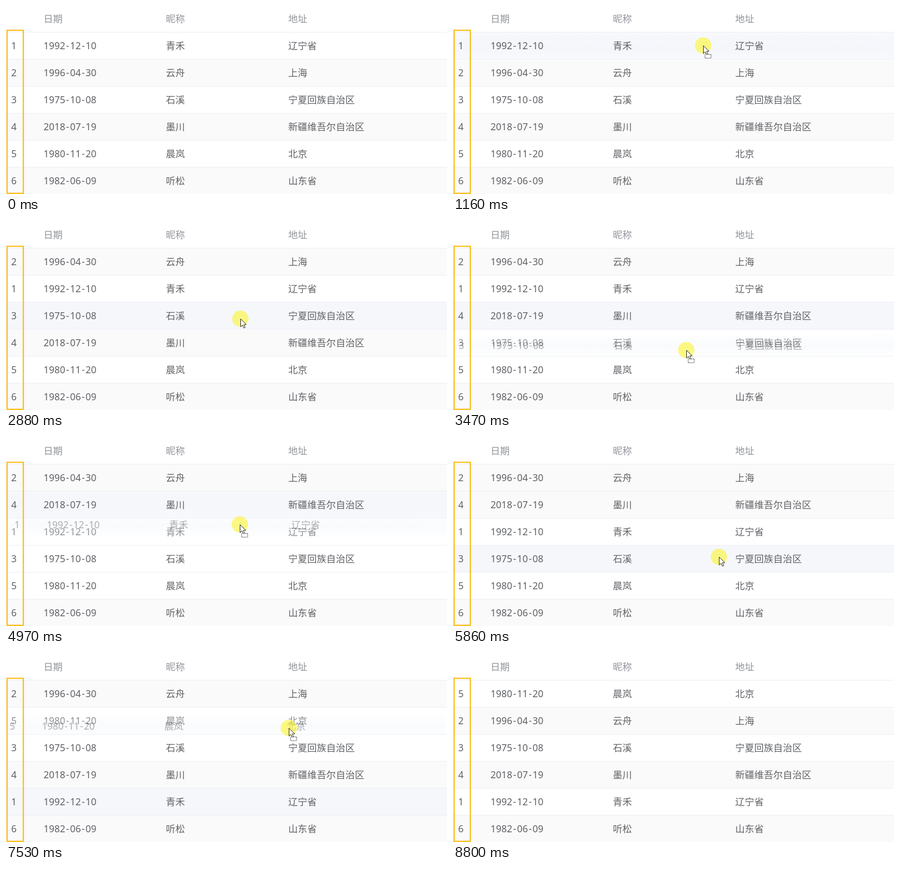
Animation of 811x348 px, one loop 9.13 s. Source, as an HTML page:

```html
<!DOCTYPE html>
<html lang="zh">
<head>
<meta charset="utf-8">
<title>Row drag sorting</title>
<style>
  html, body { margin: 0; width: 100%; height: 100%; overflow: hidden; background: #fff; }
  #stage {
    position: relative; width: 811px; height: 348px; overflow: hidden;
    font: 17.5px/49px "Noto Sans", "Noto Sans CJK SC", "Noto Sans CJK", sans-serif; color: #606266;
  }
  .row { position: absolute; left: 0; width: 811px; height: 49px; border-bottom: 1px solid #ebeef5; white-space: nowrap; }
  .row span { position: absolute; top: 0; }
  .row span:nth-child(1) { left: 9.5px; }
  .row span:nth-child(2) { left: 69px; }
  .row span:nth-child(3) { left: 294px; }
  .row span:nth-child(4) { left: 519px; }
  .row i { font-style: normal; padding: 0 1.5px; }
  .head { top: -1px; color: #909399; }
  .striped { background: #fafafa; }
  .row.hover { background: #f5f7fb; }
  #ghost {
    z-index: 1; border: 0; height: 50px; opacity: .52;
    background: linear-gradient(#fff6, #f3f6fbdd 50%, #fff6);
  }
  #overlay { position: absolute; left: 0; top: 0; z-index: 2; }
</style>
</head>
<body>
<div id="stage">
  <div id="ghost" class="row"></div>
  <svg id="overlay" width="811" height="348">
    <rect x="2.1" y="45" width="29.8" height="301.8" fill="none" stroke="#fcc022" stroke-width="2.4"/>
    <g id="pointer">
      <circle r="15" fill="#fbf52f" fill-opacity=".6"/>
      <path d="M.5 .5V15L4 11.8L6.4 17.3L8.8 16.2L6.4 10.9H11Z" fill="#fff" stroke="#222"/>
      <rect id="dropBox" x="3.5" y="16.5" width="11" height="7" fill="#fff" stroke="#000" stroke-dasharray="1" stroke-dashoffset=".5"/>
    </g>
  </svg>
</div>
<script>
const LOOP = 9130, ROW = 50, TOP = 49, PRESS_LEAD = 200;
const $ = id => document.getElementById(id);

const people = [
  ['1992-12-10', '青禾', '辽宁省'],
  ['1996-04-30', '云舟', '上海'],
  ['1975-10-08', '石溪', '宁夏回族自治区'],
  ['2018-07-19', '墨川', '新疆维吾尔自治区'],
  ['1980-11-20', '晨岚', '北京'],
  ['1982-06-09', '听松', '山东省']
];

// Each drag: the pointer waits pressed, glides between two points, then lets go
const enter = { time: 250, x: 685, y: 372 };
const leave = { time: 8790, x: 745, y: 372 };
const drags = [
  { begin: 1360, end: 2040, release: 2240, from: { x: 460, y: 73 }, to: { x: 467, y: 146 } },
  { begin: 3210, end: 3550, release: 3750, from: { x: 428, y: 182 }, to: { x: 429, y: 246 } },
  { begin: 4640, end: 5150, release: 5350, from: { x: 424, y: 123 }, to: { x: 432, y: 174 } },
  { begin: 6080, end: 6550, release: 6750, from: { x: 489, y: 220 }, to: { x: 499, y: 115 } },
  { begin: 7320, end: 7650, release: 8190, from: { x: 523, y: 277 }, to: { x: 519, y: 78 } }
];
drags.forEach(d => d.press = d.begin - PRESS_LEAD);

function glide(t, start, end, a, b) {
  const u = Math.min(1, Math.max(0, (t - start) / (end - start)));
  const e = u * u * (3 - 2 * u);
  return { x: a.x + (b.x - a.x) * e, y: a.y + (b.y - a.y) * e };
}

function pointerAt(t) {
  if (t < enter.time || t >= leave.time) return null;
  let since = enter.time, at = enter;
  for (const d of drags) {
    if (t < d.press) return glide(t, since, d.press, at, d.from);
    if (t < d.release) return glide(t, d.begin, d.end, d.from, d.to);
    since = d.release;
    at = d.to;
  }
  return glide(t, since, leave.time, at, leave);
}

const slotOf = p => Math.floor((p.y - TOP) / ROW);

function addRow(cells, className) {
  const row = document.createElement('div');
  row.className = 'row ' + className;
  row.innerHTML = cells.map(c => `<span>${c.replace(/-/g, '<i>-</i>')}</span>`).join('');
  $('stage').append(row);
  return row;
}

addRow(['', '日期', '昵称', '地址'], 'head');
const rows = people.map((p, i) => addRow([String(i + 1), ...p], i % 2 ? 'striped' : ''));

function draw(t) {
  const pointer = pointerAt(t);
  const active = drags.find(d => t >= d.press && t < d.release);
  const order = people.map((_, i) => i);
  let held;
  for (const d of drags) {
    if (t < d.press) break;
    [held] = order.splice(slotOf(d.from), 1);
    order.splice(slotOf(d === active ? pointer : d.to), 0, held);
  }

  // The highlight stays where the drag began
  const hovered = active ? slotOf(active.from) : pointer ? slotOf(pointer) : -1;
  order.forEach((item, slot) => {
    rows[item].style.top = TOP + slot * ROW + 'px';
    rows[item].classList.toggle('hover', slot === hovered);
  });

  $('ghost').style.display = active ? '' : 'none';
  $('dropBox').style.display = active ? '' : 'none';
  if (active) {
    const { from } = active;
    $('ghost').innerHTML = rows[held].innerHTML;
    $('ghost').style.left = Math.round(pointer.x - from.x) + 'px';
    $('ghost').style.top = Math.round(TOP + slotOf(from) * ROW + pointer.y - from.y) + 'px';
  }

  $('pointer').style.display = pointer ? '' : 'none';
  if (pointer) $('pointer').setAttribute('transform', `translate(${Math.round(pointer.x)} ${Math.round(pointer.y)})`);
}

function tick() {
  draw(performance.now() % LOOP);
  requestAnimationFrame(tick);
}
tick();
</script>
</body>
</html>
```
